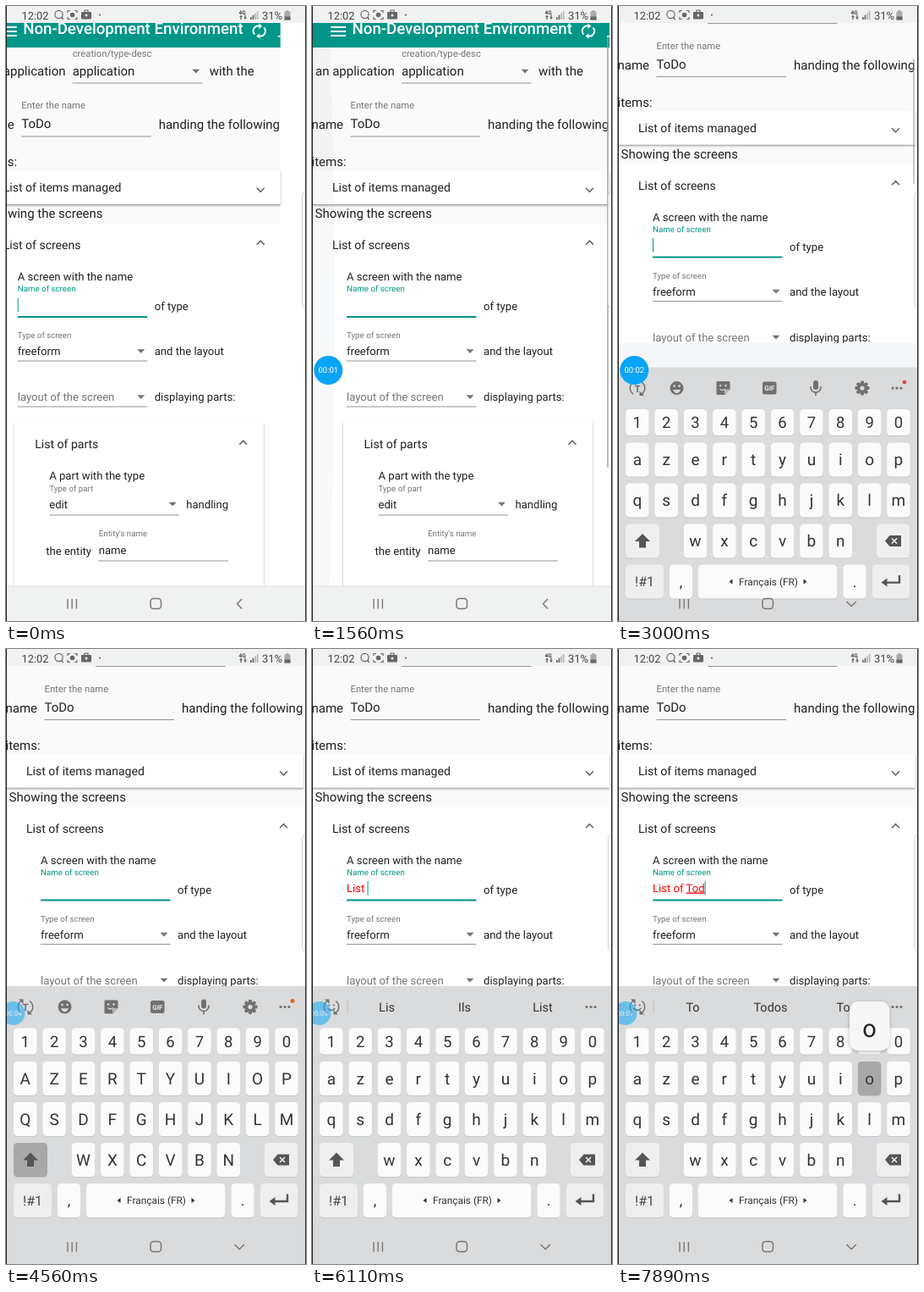
An HTML page for the animation above (8 s loop, 355x726 px).

```html
<!DOCTYPE html>
<html lang="en">
<head>
<meta charset="utf-8">
<title>Form entry on a phone</title>
<style>
  html, body { margin: 0; width: 100%; height: 100%; overflow: hidden; background: #fff; }
  svg { display: block; width: 100%; height: 100%; }
  text { font-family: Roboto, "Noto Sans", sans-serif; white-space: pre; text-rendering: geometricPrecision; }
</style>
</head>
<body>
<svg id="stage" viewBox="0 0 355 726"></svg>
<script>
const LOOP = 8000;
const TEAL = '#009688', INK = '#212121', SOFT = '#757575', BOARD = '#dadbdc';

function add(parent, tag, attrs = {}, text) {
  const el = document.createElementNS('http://www.w3.org/2000/svg', tag);
  set(el, attrs);
  if (text !== undefined) el.textContent = text;
  parent.appendChild(el);
  return el;
}
function set(el, attrs) {
  for (const k in attrs) el.setAttribute(k, attrs[k]);
}
const rect = (p, x, y, width, height, fill, more) => add(p, 'rect', { x, y, width, height, fill, ...more });
const circle = (p, cx, cy, r, fill, more) => add(p, 'circle', { cx, cy, r, fill, ...more });
const stroke = (p, d, color, w = 1.5, more) => add(p, 'path', { d, fill: 'none', stroke: color, 'stroke-width': w, ...more });
const shape = (p, d, fill) => add(p, 'path', { d, fill });
const label = (p, x, y, size, text, fill = INK, more) => add(p, 'text', { x, y, 'font-size': size, fill, ...more }, text);
const MID = { 'text-anchor': 'middle' };
const show = (el, on) => el.setAttribute('visibility', on ? 'visible' : 'hidden');
const clamp = v => Math.max(0, Math.min(1, v));
const span = (t, a, b) => clamp((t - a) / (b - a));
const smooth = p => p * p * (3 - 2 * p);
const mix = (a, b, p) => a + (b - a) * p;

const stage = document.getElementById('stage');
const defs = add(stage, 'defs');
const clip = add(defs, 'clipPath', { id: 'view' });
const clipBox = rect(clip, 0, 20, 355, 665);
for (const [id, dy, blur, alpha] of [['lift', 1.5, 1.3, 0.4], ['pop', 1, 2, 0.3]]) {
  const f = add(defs, 'filter', { id, x: '-20%', y: '-20%', width: '140%', height: '140%' });
  add(f, 'feDropShadow', { dx: 0, dy, stdDeviation: blur, 'flood-opacity': alpha });
}

// ---- page ----
rect(stage, 0, 0, 355, 726, '#fff');
const view = add(stage, 'g', { 'clip-path': 'url(#view)' });
const page = add(view, 'g');

rect(page, -40, 49, 392, 800, '#fafafa');
rect(page, -40, 0, 392, 49, TEAL);
label(page, 47.5, 33, 18.7, 'Non-Development Environment', '#fff', { 'font-weight': 500 });
for (const y of [24, 29, 34]) rect(page, 22, y, 18, 2, '#fff');
stroke(page, 'M321.5 33.500A6 6 0 0 1 327 23.500M332.500 25.500A6 6 0 0 1 327 35.500', '#fff', 1.9);
shape(page, 'M326.500 20.500l4 3.200-4 3.200zM327.500 32.300l-4 3.200 4 3.200z', '#fff');
rect(page, 349, 35, 3, 1.6, '#fff');

rect(page, -40, 194, 392, 40, '#fff', { filter: 'url(#lift)' });
rect(page, -40, 257, 392, 600, '#fff');
rect(page, 37, 490, 295, 230.500, '#fff', { rx: 3, filter: 'url(#lift)' });

const copy = [
  [15, INK, [[4, 82, 'an application'], [106, 82, 'application'], [268, 82, 'with the'], [-0.5, 145, 'name'],
    [45.5, 144, 'ToDo'], [208, 145, 'handing the following'], [-0.5, 189, 'items:'], [3.5, 250, 'Showing the screens']]],
  [14.06, INK, [[24, 219, 'List of items managed'], [24, 287, 'List of screens'], [61.5, 522, 'List of parts']]],
  [13.12, INK, [[41, 324, 'A screen with the name'], [203, 359, 'of type'], [41, 412, 'freeform'],
    [203, 412, 'and the layout'], [203, 466, 'displaying parts:'], [78.5, 559, 'A part with the type'],
    [78.5, 592.500, 'edit'], [240.500, 592.500, 'handling'], [74.5, 647.500, 'the entity'], [137, 646.500, 'name']]],
  [13.12, SOFT, [[41, 466, 'layout of the screen']]],
  [11.25, SOFT, [[106, 59.500, 'creation/type-desc'], [45.500, 121, 'Enter the name']]],
  [9.75, SOFT, [[41, 392, 'Type of screen'], [78.500, 573, 'Type of part'], [137, 626, "Entity's name"]]],
  [9.75, TEAL, [[41, 337, 'Name of screen']]]
];
for (const [size, fill, items] of copy)
  for (const [x, y, text] of items) label(page, x, y, size, text, fill);

for (const [x, y] of [[106, 91], [45.5, 154], [41, 419], [41, 473], [78.5, 601], [137, 655]])
  rect(page, x, y - 0.5, 153.5, 1, '#949494');
rect(page, 41, 366, 153.5, 2, TEAL);
for (const [x, y] of [[252, 77], [187, 407.5], [187, 461.5], [224.5, 588]])
  shape(page, `M${x - 4.5} ${y - 2.2}h9l-4.500 4.600z`, SOFT);
for (const [x, y, dy] of [[328.5, 217, 4.5], [328.5, 279.5, -4.5], [308, 515.5, -4.5]])
  stroke(page, `M${x - 4.5} ${y - dy / 2}l4.500 ${dy} 4.500 ${-dy}`, '#666', 1.6);
for (const [x, y] of [[92, 693.5], [55, 741.5]]) {
  rect(page, x - 6.5, y - 1, 13, 2, INK);
  rect(page, x - 1, y - 6.5, 2, 13, INK);
  rect(page, x + 27.5, y - 1, 13, 2, INK);
}
const value = label(page, 41, 357, 13.12, '', '#f00');
const valueHead = add(value, 'tspan');
const valueTail = add(value, 'tspan', { 'text-decoration': 'underline' });
const caret = rect(page, 41, 344.5, 1, 16.5, TEAL);

const glow = add(view, 'path', { d: 'M0 20H20Q34 370 20 690H0z', fill: '#607080' });
const thumb = rect(view, 349, 37, 2, 508, '#9a9a9a', { rx: 1 });

// ---- system bars ----
rect(stage, 0, 0, 355, 20, '#f0f1f1');
const GREY = '#666';
label(stage, 18.5, 15.5, 12.8, '12:02', '#444');
circle(stage, 62.5, 10, 4.6, 'none', { stroke: GREY, 'stroke-width': 1.2 });
stroke(stage, 'M65.500 13l2 3', GREY, 1.4);
stroke(stage, 'M73 8V5.500h3M81 5.500h3V8M84 13v2.500h-3M76 15.500h-3V13', GREY, 1.2);
circle(stage, 78.5, 10.5, 2.8, GREY);
rect(stage, 89, 7, 12, 8.5, GREY, { rx: 1 });
stroke(stage, 'M93 7V5h4v2', GREY, 1.2);
circle(stage, 95, 11, 1.5, '#f0f1f1');
circle(stage, 111, 10.5, 1.1, GREY);
label(stage, 275.5, 9.5, 6.5, '4G', '#444', { 'font-weight': 700 });
shape(stage, 'M276 13l2-2.500 2 2.500h-1.300v3h-1.400v-3zM281 13.500h1.300v-3h1.400v3H285l-2 2.500z', GREY);
for (let i = 0; i < 4; i++) rect(stage, 289 + i * 2.6, 13 - i * 2.3, 1.7, 3 + i * 2.3, i < 2 ? GREY : '#b5b5b5');
label(stage, 303, 15.5, 13, '31%', '#444');
shape(stage, 'M329.500 6.500h2V5h3v1.500h2v10h-7z', '#aaa');
rect(stage, 329.5, 12.5, 7, 4, GREY);
rect(stage, 0, 684.500, 355, 42, '#f0f1f1');
rect(stage, 0, 684.500, 355, 0.7, '#ddd');

const strip = rect(stage, 0, 398, 355, 287, '#f5f6f9');

// ---- keyboard ----
const board = add(stage, 'g');
rect(board, 0, 398, 355, 330, BOARD);
const keys = {}, PITCH = 34.35, FACE = '#fbfbfb', SIDE = '#eeeeef', DOWN = '#a8a8a9';
function key(id, x, y, w, h, fill = FACE) {
  rect(board, x - w / 2, y - h / 2 + 1, w, h, '#c6c7c8', { rx: 4.5 });
  return keys[id] = { x, y, fill, face: rect(board, x - w / 2, y - h / 2, w, h, fill, { rx: 4.5 }) };
}
[['1234567890', 463, 31, 0], ['azertyuiop', 507, 40, 0], ['qsdfghjklm', 555, 40, 0], ['wxcvbn', 603, 40, 2]]
  .forEach(([row, y, h, skip]) => [...row].forEach((ch, i) => {
    const k = key(ch, 22.8 + PITCH * (i + skip), y, 27.5, h);
    k.glyph = label(board, k.x, y + 6.6, h < 40 ? 18.5 : 19, ch, '#333', MID);
  }));
key('shift', 29, 603, 40, 40, SIDE);
shape(board, 'M29 594.500l9 9h-5v7.500h-8v-7.500h-5z', '#555');
key('back', 325.5, 603, 39, 40, SIDE);
shape(board, 'M316 603l5.500-6.500h13.500v13h-13.500z', '#555');
stroke(board, 'M324 600l6 6m0-6l-6 6', '#fff', 1.4);
key('sym', 31.5, 651, 45, 40, SIDE);
label(board, 31.5, 656.500, 16, '!#1', '#444', MID);
key(',', 74.5, 651, 27, 40);
label(board, 74.5, 657, 18, ',', '#333', MID);
key(' ', 177, 651, 164.5, 40);
label(board, 178, 655, 11.9, 'Français (FR)', '#333', MID);
shape(board, 'M131.500 651l4-3v6zM223.500 651l-4-3v6z', '#333');
key('.', 280, 651, 27, 40);
label(board, 280, 657, 18, '.', '#333', MID);
key('enter', 323, 651, 44, 40, SIDE);
stroke(board, 'M333 643.500v8.500h-17', '#555', 2.4);
shape(board, 'M311.500 652l7-5v10z', '#555');

// toolbar
const TOOL = '#707070';
const swirl = { T: add(board, 'g'), smile: add(board, 'g') };
stroke(board, 'M18 415.500A8.500 8.500 0 0 0 18 429.500M28 415.500A8.500 8.500 0 0 1 28 429.500', TOOL, 1.5);
shape(board, 'M15 413.500h5.500v5.500zM31 431.500h-5.500V426z', TOOL);
label(swirl.T, 23, 427, 11.5, 'T', TOOL, { ...MID, 'font-weight': 700 });
circle(swirl.smile, 20.3, 420.5, 1.1, TOOL);
circle(swirl.smile, 25.700, 420.5, 1.1, TOOL);
stroke(swirl.smile, 'M18.700 424q4.300 5 8.600 0', TOOL, 1.5);
for (const x of [325, 330, 335]) circle(board, x, 422.5, 1.6, TOOL);

const tools = add(board, 'g');
circle(tools, 69.5, 422.5, 8, TOOL);
circle(tools, 66.5, 420, 1.3, BOARD);
circle(tools, 72.5, 420, 1.3, BOARD);
shape(tools, 'M65 424.300h9q-1.500 4-4.500 4t-4.500-4z', BOARD);
shape(tools, 'M118 414.500h13a1.500 1.500 0 0 1 1.500 1.500v8l-6 6.500h-8.500a1.500 1.500 0 0 1-1.500-1.500v-13a1.500 1.500 0 0 1 1.500-1.500z', TOOL);
shape(tools, 'M126 430.500v-6.500h6.500z', '#b8b8b8');
circle(tools, 121, 419.500, 1.200, BOARD);
circle(tools, 127.500, 419.500, 1.200, BOARD);
stroke(tools, 'M120.500 423.500q3 3 6 0', BOARD, 1.3);
rect(tools, 171, 415, 16.500, 15, TOOL, { rx: 2.5 });
label(tools, 179.3, 425.500, 8, 'GIF', '#eee', { ...MID, 'font-weight': 700 });
rect(tools, 231, 413.500, 6, 11, TOOL, { rx: 3 });
stroke(tools, 'M228 420.500v1a6 6 0 0 0 12 0v-1M234 427.500v4', TOOL, 1.6);
for (let a = 0; a < 180; a += 45)
  rect(tools, 287, 414, 4, 17, TOOL, { rx: 1, transform: `rotate(${a} 289 422.5)` });
circle(tools, 289, 422.5, 6.3, TOOL);
circle(tools, 289, 422.5, 2.6, BOARD);
const badge = circle(tools, 339, 415.5, 2.4, '#f25c19');

const hints = add(board, 'g');
rect(hints, 41.5, 415, 1, 15, '#bbb');
const words = [88.5, 180.5, 273].map(x => label(hints, x, 428, 14.5, '', '#333', MID));

const popup = add(board, 'g');
rect(popup, -23.5, -91, 47, 58, '#f7f7f7', { rx: 10, filter: 'url(#pop)' });
const popupText = label(popup, 0, -49, 29, '', '#222', MID);

// ---- overlays ----
const NAV = '#777';
stroke(stage, 'M73 700v11.500M78.200 700v11.500M83.400 700v11.500', NAV, 1.4);
rect(stage, 171, 699.5, 12.5, 12, 'none', { rx: 3.5, stroke: NAV, 'stroke-width': 1.5 });
const navBack = stroke(stage, 'M279 700l-5.500 5.700 5.500 5.700', NAV);
const navDown = stroke(stage, 'M270.500 703l5.700 5.500 5.700-5.500', NAV);
stroke(stage, 'M356 218q-5.500 1-5.500 7v126q0 6 5.500 7', '#d4d4d4', 1, { fill: '#fff', 'fill-opacity': 0.5 });

const bubble = add(stage, 'g');
const disc = circle(bubble, 0, 0, 17, '#08a4f8');
const clock = label(bubble, 0, 0, 9.5, '', '#fff', MID);
rect(stage, 0, 0, 1, 726, '#222');
rect(stage, 354, 0, 1, 726, '#333');

// ---- script ----
const typed = [[0, ''], [4780, 'L'], [5220, 'Li'], [5550, 'Lis'], [5770, 'List'], [6080, 'List '], [6330, 'List i'],
  [6560, 'List if'], [6800, 'List of '], [7220, 'List of T'], [7540, 'List of To'], [7770, 'List of Tod']];
const guesses = [[4780, 'Le La Les'], [5220, 'Li Il Lui'], [5550, 'Lis Ils List'], [6200, 'de des of'], [6330, 'i il in'],
  [6560, 'if of il'], [6800, 'the de la'], [7220, 'T Te Tu'], [7540, 'To Todos Tout']];
const presses = [['l', 4680, 4840], ['i', 5150, 5310], ['s', 5430, 5600], ['t', 5650, 5820], [' ', 5880, 6080],
  ['i', 6270, 6420], ['f', 6490, 6650], [' ', 6710, 6850], ['t', 7150, 7300], ['o', 7430, 7600], ['d', 7700, 7880], ['o', 7880, 8000]];
const blinks = [[110, 610], [1110, 1610], [2110, 2610], [3700, 4160], [4540, 4680]];
const at = (list, t) => list.filter(e => e[0] <= t).pop();
const within = (t, a, b) => t >= a && t < b;

function render(t) {
  const scroll = 70 * smooth(span(t, 1570, 1990)) + 0.5 * span(t, 2440, 2450);
  set(page, { transform: `translate(${mix(-27.3, 0, smooth(span(t, 400, 1200)))} ${-scroll})` });
  set(glow, { opacity: 0.05 * span(t, 900, 1200) * (1 - span(t, 1500, 2200)) });

  const typing = t >= 2450;
  set(clipBox, { height: typing ? 378 : 665 });
  set(thumb, { y: typing ? 62 : 37 + scroll * 0.9, height: typing ? 148 : 508,
    opacity: 0.7 * span(t, 440, 600) * (1 - span(t, 2900, 3300)) });
  show(strip, typing);
  show(navBack, !typing);
  show(navDown, typing);
  set(board, { transform: `translate(0 ${328 * (1 - span(t, 2450, 3440)) ** 3})` });

  const text = at(typed, t)[1], cut = text.lastIndexOf(' ') + 1;
  valueHead.textContent = text.slice(0, cut);
  valueTail.textContent = text.slice(cut);
  set(caret, { x: 41 + (text ? value.getComputedTextLength() : 0) });
  show(caret, !blinks.some(b => within(t, ...b)));

  const auto = within(t, 3200, 4780), caps = auto || within(t, 7000, 7220);
  const press = presses.find(p => within(t, p[1], p[2]));
  for (const id in keys) {
    const k = keys[id], held = press && press[0] === id || id === 'shift' && auto;
    set(k.face, { fill: held ? DOWN : k.fill });
    if (k.glyph) k.glyph.textContent = caps ? id.toUpperCase() : id;
  }
  const pop = press && press[0] !== ' ';
  show(popup, pop);
  if (pop) {
    const k = keys[press[0]];
    set(popup, { transform: `translate(${k.x} ${k.y})` });
    popupText.textContent = k.glyph.textContent;
  }

  const guess = at(guesses, t);
  show(tools, !guess);
  show(swirl.T, !guess);
  show(hints, guess);
  show(swirl.smile, guess);
  if (guess) guess[1].split(' ').forEach((w, i) => words[i].textContent = w);
  set(badge, { fill: t < 3110 ? '#f44336' : '#f25c19' });

  const dock = smooth(span(t, 3080, 3440));
  show(bubble, t >= 110);
  set(bubble, { transform: `translate(${mix(19.3, 8.5, dock)} 430)`, opacity: mix(1, 0.52, dock) });
  set(disc, { r: mix(17, 14, dock) });
  set(clock, { 'font-size': mix(9.5, 8, dock), y: mix(3.4, 2.9, dock) });
  clock.textContent = '00:0' + Math.max(0, Math.floor((t - 200) / 1000));
}

const start = performance.now();
function tick() {
  render((performance.now() - start) % LOOP);
  requestAnimationFrame(tick);
}
tick();
</script>
</body>
</html>
```
